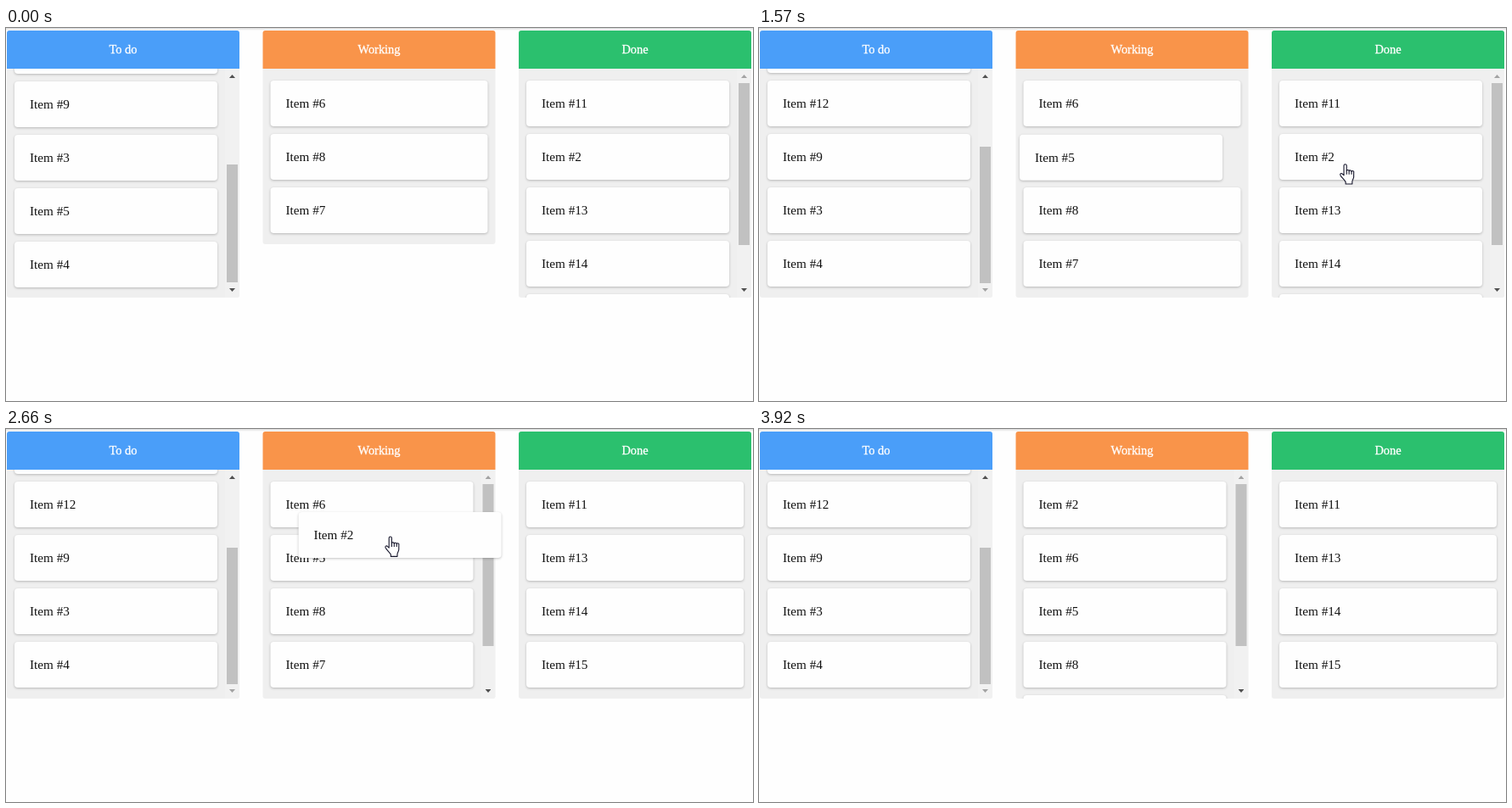
An HTML page that plays this animation: 880 px wide and 440 px high, repeating every 4220 ms.

```html
<!DOCTYPE html>
<html lang="en">
<head>
<meta charset="utf-8">
<title>Task board</title>
<style>
html, body { margin: 0; width: 100%; height: 100%; overflow: hidden; background: #fefefe; }
body { font-family: "Liberation Serif", "Times New Roman", serif; position: relative; }
div, svg { position: absolute; box-sizing: border-box; }
.top { width: 100%; height: 3px; background: linear-gradient(#dcdcdc, #fefefe); }
.column { top: 3px; left: 0; width: 274px; }
.head { width: 100%; height: 45px; border-radius: 3px 3px 0 0; color: #fff; font-size: 14.4px; line-height: 45px; text-align: center; -webkit-text-stroke: .3px #fff; }
.list { top: 45px; width: 100%; height: 270px; overflow: hidden; background: #efefef; border-radius: 0 0 3px 3px; }
.card { left: 0; top: 0; width: 239px; height: 54px; padding-left: 18px; border-radius: 4px; background: #fefefe; color: #111; font-size: 15.2px; line-height: 54px; white-space: nowrap; box-shadow: 0 1px 3px rgba(0, 0, 0, .24); }
.bar { right: 0; width: 17px; height: 100%; background: #f1f1f1; }
.thumb { left: 2px; width: 13px; background: #c1c1c1; }
.arrow { left: 5px; width: 7px; height: 4px; background: #505050; }
.up { top: 7px; clip-path: polygon(50% 0, 100% 100%, 0 100%); }
.down { bottom: 7px; clip-path: polygon(0 0, 100% 0, 50% 100%); }
.off { background: #a3a3a3; }
#cursor { left: 0; top: 0; }
</style>
</head>
<body>
<div class="top"></div>
<script>
const LOOP = 4220, STEP = 60, SETTLE = 250;
const PITCH = 63, FIRST = 62, LIST_TOP = 48, WIDE = 256, NARROW = 239;
const ENTER = 250, EXIT = 3920;
const GRAB_A = 820, DROP_A = 1425, GRAB_B = 1840, DROP_B = 3250;
const LEAVE_TODO = 992, OPEN_WORKING = 1053, LEAVE_DONE = 2034, PUSH_WORKING = 2840;

// The picture is redrawn in fixed steps counted from the start of each gesture.
const gestures = [0, ENTER, GRAB_A, 1390, 1920, 2500, 3050, 3580, EXIT];

// Pointer moves: start, end, then the place reached.
const origin = [380, 385];
const moves = [
  [ENTER, 650, 160, 208],
  [GRAB_A, 1120, 428, 150],
  [DROP_A, 1585, 690, 160],
  [1600, GRAB_B, 711, 153],
  [GRAB_B, 2040, 502, 131],
  [2040, 2660, 445, 126],
  [2660, 2980, 407, 93],
  [3560, 3880, 860, 416],
];

const mix = (a, b, u) => a + (b - a) * u;
const ramp = (t, start, end) => Math.min(1, Math.max(0, (t - start) / (end - start)));
const smooth = u => u * u * (3 - 2 * u);
const settle = (t, start) => 1 - (1 - ramp(t, start, start + SETTLE) ** 1.3) ** 3;

function snap(t) {
  const start = gestures.findLast(g => g <= t);
  return t - (t - start) % STEP;
}

function pointer(t) {
  return moves.reduce(([x, y], [start, end, toX, toY]) => {
    const u = smooth(ramp(t, start, end));
    return [mix(x, toX, u), mix(y, toY, u)];
  }, origin);
}

function add(parent, cls, text = '') {
  const el = document.createElement('div');
  el.className = cls;
  el.textContent = text;
  return parent.appendChild(el);
}

function move(el, x, y) { el.style.transform = `translate(${x}px, ${y}px)`; }
function show(el, on) { el.style.display = on ? '' : 'none'; }

function makeColumn(index, title, color, ids) {
  const root = add(document.body, 'column');
  move(root, 1 + 301.5 * index, 0);
  add(root, 'head', title).style.background = color;
  const list = add(root, 'list');
  const cards = ids.map(id => add(list, 'card', 'Item #' + id));
  const bar = add(list, 'bar');
  return { ids, list, cards, bar, up: add(bar, 'arrow up'), down: add(bar, 'arrow down'), thumb: add(bar, 'thumb') };
}

// Lays out the cards; top(i, id) gives the height on the stage, hidden is the id in flight.
function layout(column, width, hidden, top) {
  column.cards.forEach((card, i) => {
    move(card, 9, top(i, column.ids[i]) - LIST_TOP);
    card.style.width = width + 'px';
    show(card, !hidden.includes(column.ids[i]));
  });
}

function setBar(column, top, length, atTop, atBottom) {
  column.thumb.style.top = top - LIST_TOP + 'px';
  column.thumb.style.height = length + 'px';
  column.up.classList.toggle('off', atTop);
  column.down.classList.toggle('off', atBottom);
}

const todo = makeColumn(0, 'To do', '#4a9ef9', [10, 12, 9, 3, 5, 4]);
const working = makeColumn(1, 'Working', '#f9944a', [2, 6, 5, 8, 7]);
const done = makeColumn(2, 'Done', '#2bc06e', [11, 2, 13, 14, 15]);
const ghostA = add(document.body, 'card', 'Item #5');
const ghostB = add(document.body, 'card', 'Item #2');
document.body.insertAdjacentHTML('beforeend', `<svg id="cursor" width="19" height="26"
  fill="#fff" stroke="#15152a" stroke-width="1.1" stroke-linejoin="round">
  <path d="M5.5 14V2.6a1.6 1.6 0 0 1 3.2 0V8.6a1.5 1.3 0 0 1 2.9 .4a1.5 1.3 0 0 1 2.9 .6a1.4 1.4 0 0 1 2.6 1.2V16c0 2-1.5 3-1.8 5.5V24.3H7.6V22C6.4 19.5 3.2 17 1.5 14.2C.4 12.2 2.4 11 3.9 12.5Z"/>
  <path fill="none" d="M8.7 8.6V13M11.6 9V13M14.5 9.6V13"/></svg>`);
const cursor = document.getElementById('cursor');

function drawTodo(t, x, y) {
  const p = settle(t, LEAVE_TODO), close = PITCH * settle(t, LEAVE_TODO + 18);
  layout(todo, NARROW, t < GRAB_A ? [] : [5],
    (i, id) => (i - 1) * PITCH + (PITCH - 1) * p - (id === 4 ? close : 0));
  const atEnd = p > 0, length = mix(139, 161, p);
  setBar(todo, (atEnd ? 301 : 300) - length, length, false, atEnd);
  const hover = t >= ENTER && t < GRAB_A && Math.abs(x + 6 - 266) < 9 && y > 161 && y < 300;
  todo.thumb.style.background = hover ? '#a8a8a8' : '';
}

function drawWorking(t) {
  const open = settle(t, OPEN_WORKING), push = settle(t, PUSH_WORKING), scrolls = t >= LEAVE_DONE;
  const hidden = [t < DROP_B + SETTLE && 2, t < DROP_A + SETTLE && 5];
  layout(working, scrolls ? NARROW : WIDE, hidden,
    i => FIRST + PITCH * (i === 0 ? 0 : i - 1 + push - (i > 2 ? 1 - open : 0)));
  working.list.style.height = (t < OPEN_WORKING ? 207 : 270) + 'px';
  show(working.bar, scrolls);
  setBar(working, 65, 191, true, false);
}

function drawDone(t) {
  const close = settle(t, LEAVE_DONE), scrolls = close < 1;
  layout(done, scrolls ? NARROW : WIDE, t < GRAB_B ? [] : [2],
    i => FIRST + PITCH * (i > 1 ? i - close : i));
  show(done.bar, scrolls);
  setBar(done, 65, mix(191, 236, settle(t, LEAVE_DONE - 22)), true, false);
}

function drawGhost(el, t, grab, drop, offset, homeY) {
  show(el, t >= grab && t < drop + SETTLE);
  const held = Math.min(t, drop), [x, y] = pointer(held), [dx, dy] = offset(held), u = settle(t, drop);
  move(el, mix(x - dx, 311.5, u), mix(y - dy, homeY, u));
}

function render(t) {
  const [x, y] = pointer(t);
  drawTodo(t, x, y);
  drawWorking(t);
  drawDone(t);
  drawGhost(ghostA, t, GRAB_A, DROP_A, () => [151, 19], FIRST + PITCH);
  drawGhost(ghostB, t, GRAB_B, DROP_B, s => [98 + 5 * ramp(s, 2040, 2980), 28], FIRST);
  show(cursor, t >= ENTER && t < EXIT);
  move(cursor, x, y);
}

function tick() {
  render(snap(performance.now() % LOOP));
  requestAnimationFrame(tick);
}
tick();
</script>
</body>
</html>
```
